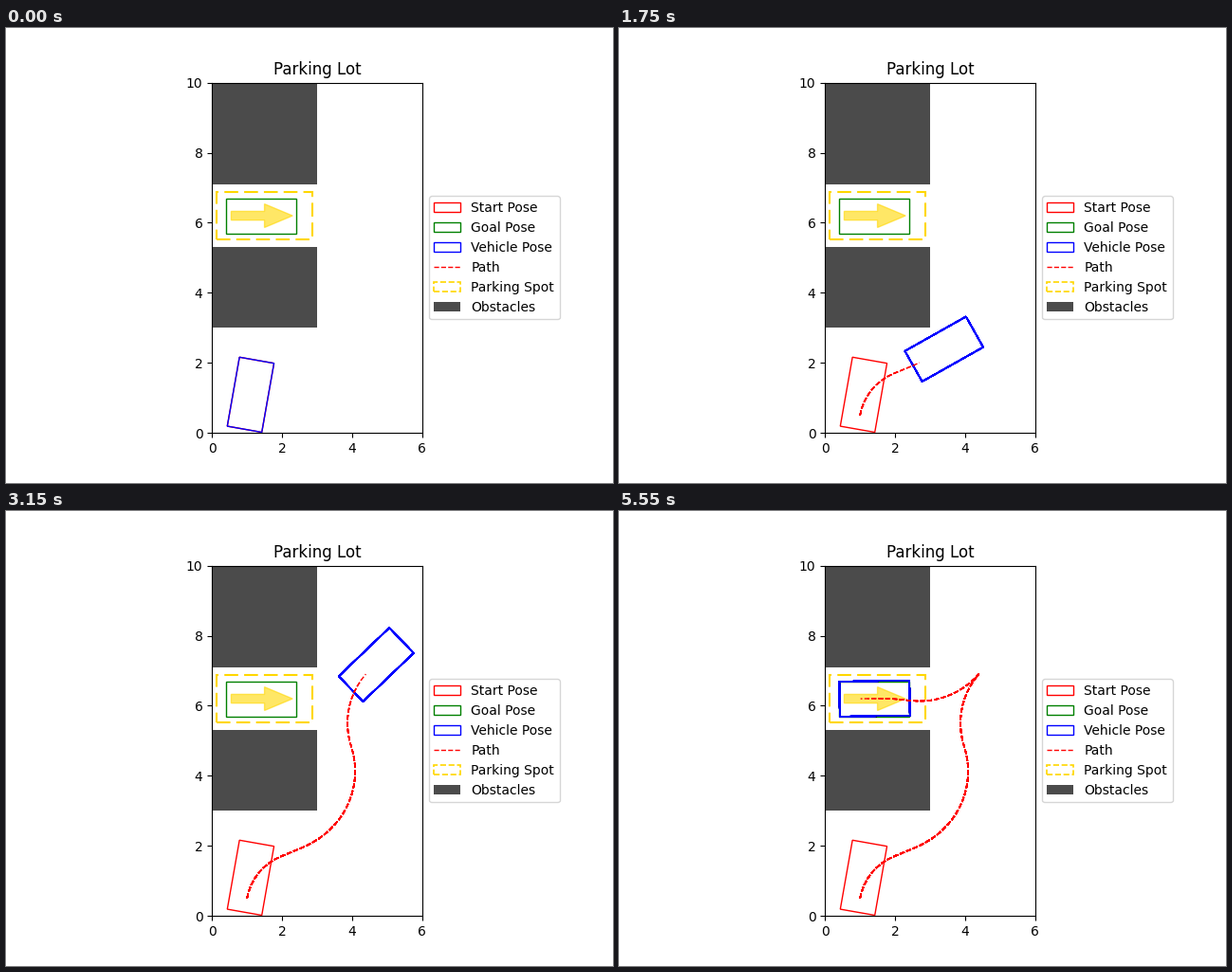
These frames come from a looping animation (640x480 px, 6.05 s). A matplotlib script:

```python
import numpy as np
import matplotlib.pyplot as plt
from matplotlib.animation import FuncAnimation
from matplotlib.lines import Line2D
from matplotlib.patches import Patch, Polygon, Rectangle

FRAMES, INTERVAL = 121, 50
WAIT = 22                     # frames spent at the start pose
STEP = 0.2                    # distance driven per frame
LENGTH, WIDTH, REAR = 2.0, 1.0, 0.4
START = (1.0, 0.5, 80.0)
GOAL = (0.8, 6.2, 0.0)

# (steps, direction, degrees turned per step)
RUNS = [
    (8, 1, -7.2), (3, 1, 0.0), (2, 1, 3.5),
    (5, 1, 4.7), (11, 1, 5.02), (2, 1, -5.35), (9, 1, -5.39),
    (11, -1, -5.1), (5, -1, 1.6), (3, -1, 0.0),
]


def drive():
    x, y, deg = START
    poses = [START]
    for steps, direction, turn in RUNS:
        for _ in range(steps):
            mid = np.radians(deg + turn / 2)
            x += direction * STEP * np.cos(mid)
            y += direction * STEP * np.sin(mid)
            deg += turn
            poses.append((x, y, deg))
    return np.array(poses)


def corners(pose):
    x, y, deg = pose
    a = np.radians(deg)
    c, s = np.cos(a), np.sin(a)
    back, front, half = -REAR, LENGTH - REAR, WIDTH / 2
    local = np.array([(back, -half), (front, -half), (front, half), (back, half)])
    return local @ np.array([(c, s), (-s, c)]) + (x, y)


poses = drive()
last = len(poses) - 1

fig, ax = plt.subplots(figsize=(6.4, 4.8), dpi=100)
ax.set_aspect("equal")
ax.set_xlim(0, 6)
ax.set_ylim(0, 10)
ax.set_xticks(range(0, 7, 2))
ax.set_yticks(range(0, 11, 2))
ax.set_title("Parking Lot")

DARK = "#4b4b4b"
for bottom, height in ((3, 2.3), (7.1, 2.9)):
    ax.add_patch(Rectangle((0, bottom), 3, height, facecolor=DARK, edgecolor="none"))
ax.add_patch(Rectangle((0.13, 5.52), 2.74, 1.36, fill=False, edgecolor="gold",
                       linewidth=1.5, linestyle=(0, (7, 3))))
ax.arrow(0.55, 6.2, 0.95, 0, width=0.25, head_width=0.67, head_length=0.8,
         length_includes_head=False, color="gold", alpha=0.6)
ax.add_patch(Polygon(corners(START), fill=False, edgecolor="red"))
ax.add_patch(Rectangle((GOAL[0] - REAR, GOAL[1] - WIDTH / 2), LENGTH, WIDTH,
                       fill=False, edgecolor="green"))

# One more overlaid outline per frame makes the strokes firmer over time.
cars = [ax.add_patch(Polygon(corners(START), fill=False, edgecolor="blue"))
        for _ in range(FRAMES)]
trails = [ax.plot(poses[:k, 0], poses[:k, 1], "r--", linewidth=1)[0]
          for k in range(2, last + 1)]

ax.legend(handles=[
    Patch(fill=False, edgecolor="red", label="Start Pose"),
    Patch(fill=False, edgecolor="green", label="Goal Pose"),
    Patch(fill=False, edgecolor="blue", label="Vehicle Pose"),
    Line2D([], [], color="red", linestyle="--", linewidth=1, label="Path"),
    Patch(fill=False, edgecolor="gold", linestyle="--", linewidth=1.2,
          label="Parking Spot"),
    Patch(facecolor=DARK, edgecolor="none", label="Obstacles"),
], loc="center left", bbox_to_anchor=(1, 0.5))


def draw(n):
    step = min(max(n - WAIT, 0), last)
    shape = corners(poses[step])
    for i, car in enumerate(cars):
        car.set_visible(i <= n)
        if i <= n:
            car.set_xy(shape)
    for k, trail in enumerate(trails, start=2):
        trail.set_visible(k <= step)
    return cars + trails


def reset():
    return draw(0)


anim = FuncAnimation(fig, draw, frames=FRAMES, init_func=reset,
                     interval=INTERVAL, repeat=True, repeat_delay=0, blit=False)
plt.show()
```
